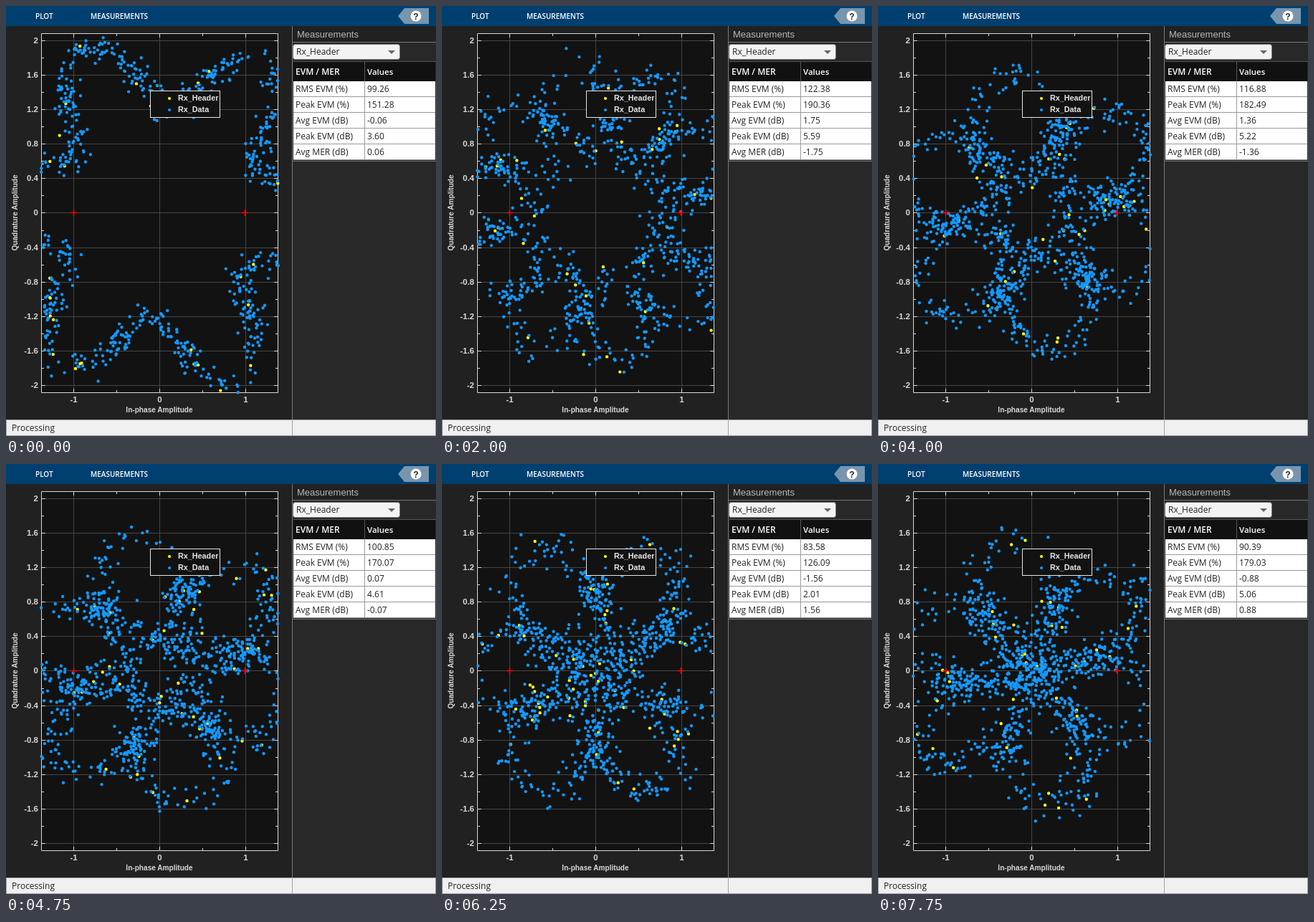
Animation of 600 by 600 pixels, one loop 8000 ms. Source, as an HTML page:

```html
<!DOCTYPE html>
<html lang="en">
<head>
<meta charset="utf-8">
<title>Constellation</title>
<style>
html, body { margin: 0; width: 100%; height: 100%; overflow: hidden; background: #282828; }
svg { display: block; width: 600px; height: 600px; }
.ui { font: 12px "Open Sans", "Noto Sans", sans-serif; fill: #222; }
.tab { font: 600 10px "Open Sans", sans-serif; fill: #fff; }
.title { font: 13px "Liberation Sans", Arial, sans-serif; fill: #b8b8b8; }
.tick { font: bold 11.5px "Liberation Sans", Arial, sans-serif; fill: #d9d9d9; }
.label { font: bold 10.1px "Liberation Sans", Arial, sans-serif; fill: #d9d9d9; text-anchor: middle; }
.key { font: bold 10.8px "Liberation Sans", Arial, sans-serif; fill: #e6e6e6; }
.help { font: bold 12px "Liberation Sans", Arial, sans-serif; fill: #222; text-anchor: middle; }
.head { font-weight: 600; fill: #fff; }
.dots { fill: none; stroke-width: 4.4; stroke-linecap: round; }
.thin { fill: none; stroke-width: 1; }
</style>
</head>
<body>
<svg viewBox="0 0 600 600">
  <rect width="600" height="600" fill="#282828"/>
  <rect y="28" width="399" height="549" fill="#212121"/>
  <rect width="600" height="28" fill="#004070"/>
  <text class="tab" x="41" y="18">PLOT</text>
  <text class="tab" x="118" y="18">MEASUREMENTS</text>
  <path d="M547 14L556 3H590V25H556Z" fill="#7895ad"/>
  <circle cx="572" cy="14" r="7.5" fill="#fff"/>
  <text class="help" x="572" y="18.5">?</text>

  <rect x="50" y="39" width="329" height="500" fill="#121212"/>
  <path id="grid" class="thin" stroke="#464646"/>
  <path id="ticks" class="thin" stroke="#d9d9d9"/>
  <g id="nums"></g>
  <text class="label" x="214" y="567">In-phase Amplitude</text>
  <text class="label" transform="translate(16 288.5) rotate(-90)">Quadrature Amplitude</text>
  <path id="header" class="dots" stroke="#ffff11"/>
  <path id="data" class="dots" stroke="#1399ff"/>
  <path d="M90 288.5h9M94.5 284v9M329 288.5h9M333.5 284v9" stroke="#f00" stroke-width="1.6"/>
  <rect x="201.5" y="118.5" width="97" height="37" fill="#121212" stroke="#e6e6e6"/>
  <circle cx="228" cy="129" r="2.1" fill="#ffff11"/>
  <circle cx="228" cy="145" r="2.1" fill="#1399ff"/>
  <text class="key" x="240" y="132">Rx_Header</text>
  <text class="key" x="240" y="148">Rx_Data</text>

  <rect x="400" y="28" width="200" height="22" fill="#212121"/>
  <path class="thin" d="M399.5 28V577M400 50.5H600M400 216.5H600" stroke="#777"/>
  <text class="title" x="406" y="44">Measurements</text>
  <rect x="400.5" y="53.5" width="149" height="21" rx="3" fill="#f3f3f3" stroke="#777"/>
  <text class="ui" x="405" y="68">Rx_Header</text>
  <path d="M533 62H543L538 67Z" fill="#666"/>
  <rect x="401" y="78" width="198" height="27" fill="#111"/>
  <path class="thin" d="M401 77.5H600M500.5 78V105" stroke="#555"/>
  <text class="ui head" x="404" y="96">EVM / MER</text>
  <text class="ui head" x="504" y="96" style="font-size:11.5px">Values</text>
  <g id="rows"></g>

  <path d="M.5 577.5H399.5V599.5H.5ZM399.5 577.5H599.5V599.5H399.5Z" fill="#f0f0f0" stroke="#a0a0a0"/>
  <text class="ui" x="8" y="593">Processing</text>
</svg>
<script>
const STEP = 250, STEPS = 32;
const CX = 214.5, CY = 288.5, UNIT = 120.25;
const $ = id => document.getElementById(id);
const lerp = (a, b, t) => a + (b - a) * t;

// Axes
let grid = '', ticks = 'M49.5 38.5H379.5V539.5H49.5Z', nums = '';
for (let i = -5; i <= 5; i++) {
  const y = Math.round(288.49 - i * 48.1) + .5;
  grid += `M50 ${y}H379`;
  ticks += `M50 ${y}h5M379 ${y}h-5`;
  if (i < 5) ticks += `M50 ${y - 24}h3M379 ${y - 24}h-3`;
  nums += `<text class="tick" x="45" y="${y + 3.5}" text-anchor="end">${+(i * .4).toFixed(1)}</text>`;
}
for (let i = -1; i <= 1; i += .5) {
  const x = CX + i * 120, major = Number.isInteger(i), len = major ? 5 : 3;
  ticks += `M${x} 39v${len}M${x} 539v-${len}`;
  if (!major) continue;
  grid += `M${x} 39V539`;
  nums += `<text class="tick" x="${x}" y="553" text-anchor="middle">${i}</text>`;
}
$('grid').setAttribute('d', grid);
$('ticks').setAttribute('d', ticks);
$('nums').innerHTML = nums;

// Table
const names = ['RMS EVM (%)', 'Peak EVM (%)', 'Avg EVM (dB)', 'Peak EVM (dB)', 'Avg MER (dB)'];
$('rows').innerHTML = names.map((name, i) => {
  const y = 105 + i * 22;
  return `<rect x="401" y="${y}" width="198" height="21" fill="#fff"/>
    <path class="thin" d="M401 ${y + 21.5}H599M500.5 ${y}v22" stroke="#999"/>
    <text class="ui" x="404" y="${y + 15}">${name}</text>
    <text class="ui value" x="504" y="${y + 15}"></text>`;
}).join('');
const cells = document.querySelectorAll('.value');

// RMS and peak error in percent, and the direction of one lobe in degrees
const keys = [
  { step: 0, rms: 99.26, peak: 151.28, turn: 55 },
  { step: 8, rms: 122.38, peak: 190.36, turn: 64 },
  { step: 12, rms: 124.83, peak: 207.64, turn: 45 },
  { step: 16, rms: 116.884, peak: 182.49, turn: 40 },
  { step: 23, rms: 84.64, peak: 144.36, turn: 45 },
  { step: 27, rms: 73.89, peak: 122.57, turn: 75 },
  { step: 31, rms: 90.39, peak: 179.03, turn: 100 },
];

function random(seed) {
  let s = seed * 7919 + 12345;
  return () => {
    s = s + 0x6D2B79F5 | 0;
    let t = Math.imul(s ^ s >>> 15, 1 | s);
    t = t + Math.imul(t ^ t >>> 7, 61 | t) ^ t;
    return ((t ^ t >>> 14) >>> 0) / 4294967296;
  };
}

// BPSK symbols on a lobed ring: the ring shrinks, its lobes grow and become fewer.
function draw(step) {
  const next = Math.max(1, keys.findIndex(k => k.step >= step));
  const a = keys[next - 1], b = keys[next];
  const mix = (step - a.step) / (b.step - a.step);
  const at = name => lerp(a[name], b[name], mix);
  const rnd = random(step + 1);
  const gauss = () => (rnd() + rnd() + rnd() + rnd() - 2) * 1.73;

  const t = step * STEP / 1000;
  const mean = .75 + .9 * Math.exp(-t / 3.2);
  const depth = .47 + .035 * t;
  const lobes = Math.max(3, Math.round(6 - .3 * t * t));
  const turn = at('turn') * Math.PI / 180;
  const noise = .075 + .004 * t;
  const count = 1000 + 60 * Math.min(t, 4);

  let header = '', data = '';
  for (let i = 0; i < count; i++) {
    const v = rnd() * 2 * Math.PI * lobes;
    const phase = v + .3 * Math.sin(2 * v);  // crowd the dots where branches cross
    const angle = turn + phase / lobes;
    const r = (mean + depth * Math.cos(phase)) * (rnd() < .5 ? 1 : -1);
    const x = CX + UNIT * (r * Math.cos(angle) + noise * gauss());
    const y = CY - UNIT * (r * Math.sin(angle) + noise * gauss());
    const isHeader = rnd() < .04;
    if (x < 49 || x > 380 || y < 38 || y > 540) continue;
    const dot = `M${x.toFixed(1)} ${y.toFixed(1)}h0`;
    if (isHeader) header += dot; else data += dot;
  }
  $('header').setAttribute('d', header);
  $('data').setAttribute('d', data);

  const wobble = 12 * mix * (1 - mix);
  const rms = at('rms') + gauss() * wobble;
  const peak = at('peak') + gauss() * wobble * 2;
  const dB = v => 20 * Math.log10(v / 100);
  [rms, peak, dB(rms), dB(peak), -dB(rms)].forEach((v, i) => cells[i].textContent = v.toFixed(2));
}

let shown = -1;
function tick() {
  const step = Math.floor(performance.now() / STEP) % STEPS;
  if (step !== shown) draw(shown = step);
  requestAnimationFrame(tick);
}
tick();
</script>
</body>
</html>
```
